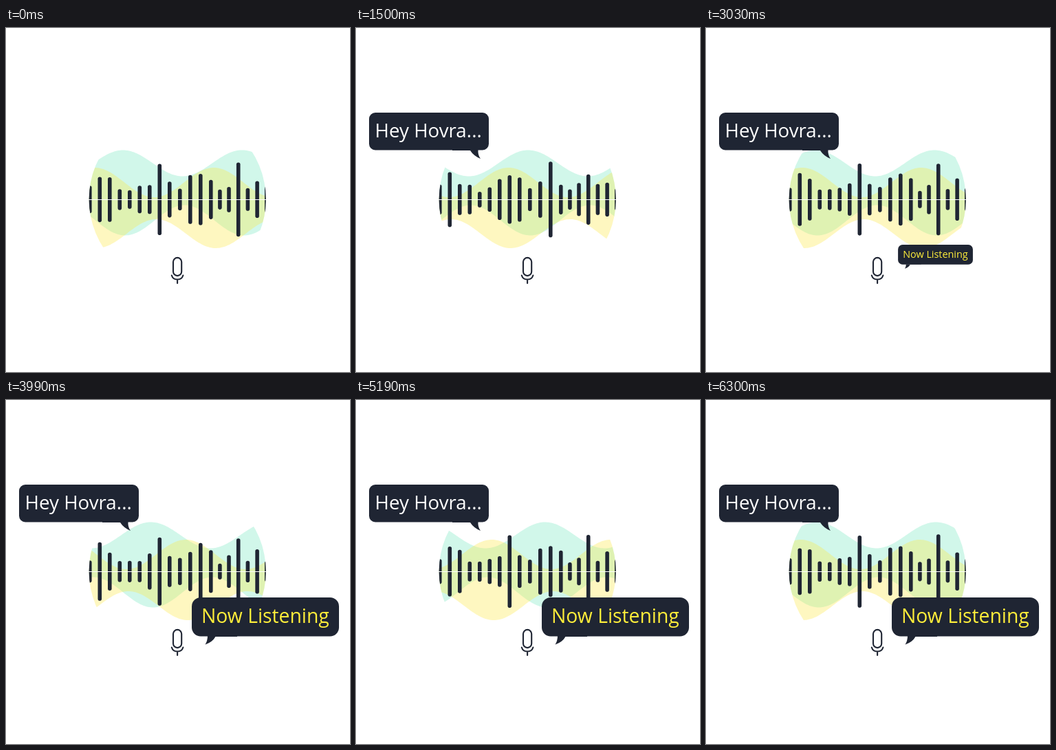
An HTML page with a canvas that plays this animation: 500x500 px, repeating every 6330 ms.

```html
<!DOCTYPE html>
<html lang="en">
<head>
<meta charset="utf-8">
<title>Voice assistant</title>
<style>
html, body { margin: 0; width: 100%; height: 100%; overflow: hidden; background: #fff; }
canvas { display: block; width: 100vw; height: 100vh; }
</style>
</head>
<body>
<canvas id="stage" width="500" height="500"></canvas>
<script>
const ctx = document.getElementById('stage').getContext('2d');
const LOOP = 6330, MID = 249.3, WAVELENGTH = 173, DRIFT = 0.0535;
const INK = '#1f2533', TURN = 2 * Math.PI;

// Typical half-height of each bar; they swing around it
const sizes = [20, 38, 27, 18, 13, 18, 26, 44, 28, 17, 30, 46, 26, 14, 22, 45, 19, 27, 17];

const bubbles = [
  { text: 'Hey Hovra...', color: '#fff', x: 19, y: 123, w: 174, h: 54.5, r: 9,
    tx: 27.6, ty: 158.5, size: 27.7, ox: 178.5, oy: 178, start: 910, grow: 590,
    tail: 'M140 177V178H166Q171 186 181 190Q177 185 177.5 177Z' },
  { text: 'Now Listening', color: '#ffee3a', x: 270, y: 287, w: 214, h: 56.5, r: 13,
    tx: 284, ty: 323.8, size: 28.3, ox: 288.5, oy: 344, start: 2670, grow: 710,
    tail: 'M293 343Q293 350 289.5 355.5Q300 352 304.5 344H336V343Z' }
];
for (const b of bubbles) b.tail = new Path2D(b.tail);
const mic = new Path2D('M243 340a6 6 0 0 1 12.2 0v14a6 6 0 0 1-12.2 0z' +
  'M240.8 359.5Q242.5 365.5 249.1 365.5Q255.7 365.5 257.4 359.5M249.1 365.5V371');

// A band that is thickest at its crest and pinched half a wave later
function band(color, crest, top, topAmp, bottom, bottomAmp) {
  const swing = x => Math.cos((x - crest) * TURN / WAVELENGTH);
  ctx.beginPath();
  for (let x = 118; x <= 382; x += 2) ctx.lineTo(x, top - topAmp * swing(x));
  for (let x = 382; x >= 118; x -= 2) ctx.lineTo(x, bottom + bottomAmp * swing(x - 3));
  ctx.fillStyle = color;
  ctx.fill();
}

function bars(t) {
  ctx.fillStyle = INK;
  let x = 121.8;
  sizes.forEach((size, n) => {
    const h = size * (1 + 0.2 * Math.sin(TURN * (6 * t / LOOP + n * 0.618)));
    ctx.beginPath();
    ctx.roundRect(x - 2.8, MID - h, 5.6, 2 * h, 2.8);
    ctx.fill();
    x += n < 8 ? 14.5 : n < 12 ? 15 : n < 14 ? 13.1 : 13.7;
  });
}

function bubble(b, t) {
  const s = Math.min(1, (t - b.start) / b.grow);
  if (s <= 0) return;
  ctx.save();
  ctx.translate(b.ox, b.oy);
  ctx.scale(s, s);
  ctx.translate(-b.ox, -b.oy);
  ctx.fillStyle = INK;
  ctx.beginPath();
  ctx.roundRect(b.x, b.y, b.w, b.h, b.r);
  ctx.fill();
  ctx.fill(b.tail);
  ctx.fillStyle = b.color;
  ctx.font = `${b.size}px "Open Sans", sans-serif`;
  ctx.fillText(b.text, b.tx, b.ty);
  ctx.restore();
}

function draw(t) {
  ctx.fillStyle = '#fff';
  ctx.fillRect(0, 0, 500, 500);

  ctx.save();
  ctx.beginPath();
  ctx.arc(249.2, 249, 128.6, 0, TURN);
  ctx.clip();
  band('#d1f7ea', 170 + DRIFT * t, 196.5, 19, 279.5, 22);
  band('rgba(252,230,64,.33)', 302 - DRIFT * t, 224.5, 21.5, 299, 21);
  bars(t);
  ctx.restore();

  ctx.fillStyle = '#fff';
  ctx.fillRect(119, 249, 261, 1);

  ctx.strokeStyle = INK;
  ctx.lineWidth = 2.1;
  ctx.lineCap = 'round';
  ctx.stroke(mic);

  for (const b of bubbles) bubble(b, t);
}

const begin = performance.now();
function tick() {
  draw((performance.now() - begin) % LOOP);
  requestAnimationFrame(tick);
}
tick();
</script>
</body>
</html>
```
